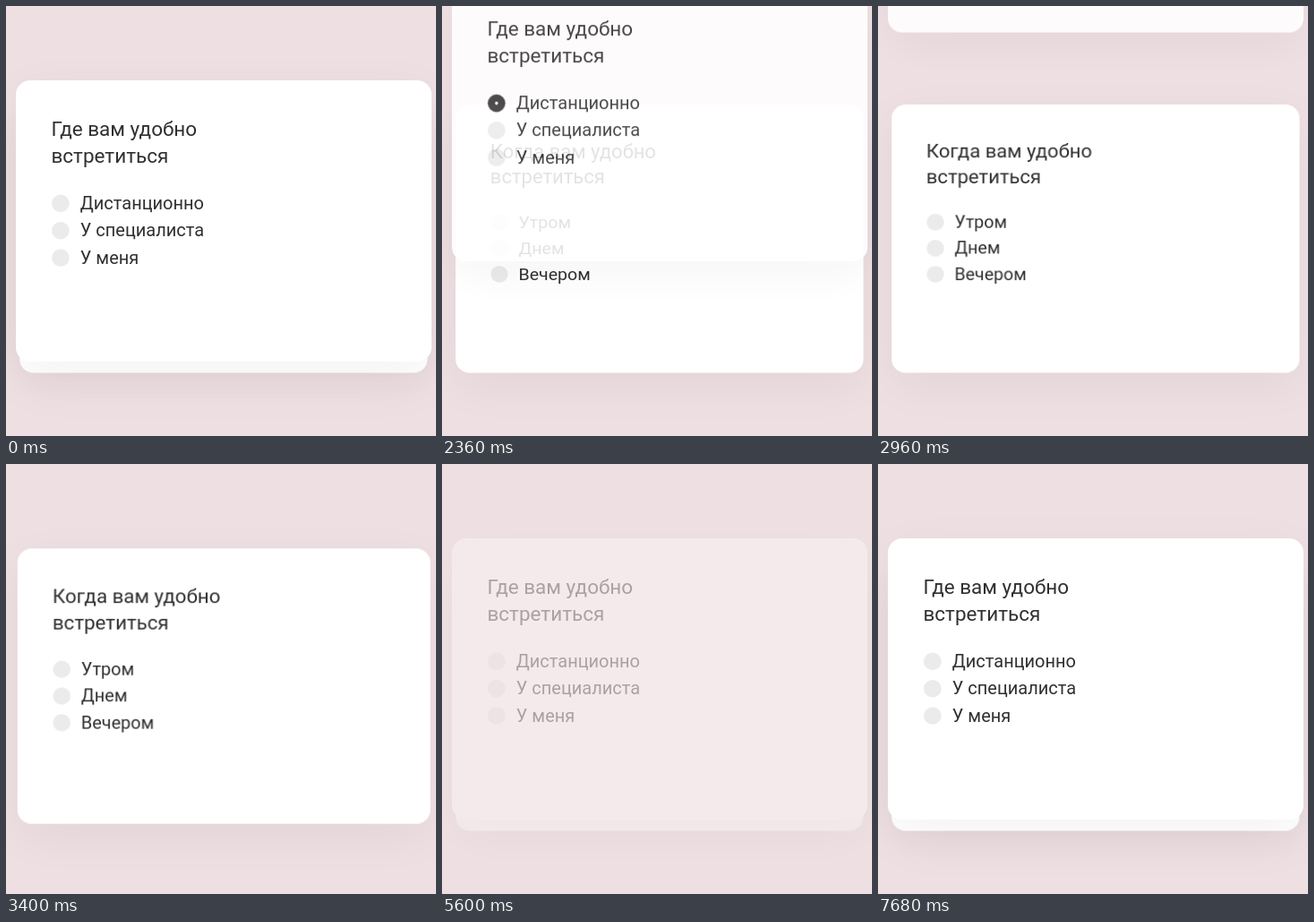
Recreate the animation shown at these times as an HTML page. Size 480 px wide and 480 px high, loop 8000 ms.

```html
<!DOCTYPE html>
<html lang="ru">
<head>
<meta charset="utf-8">
<title>Опрос</title>
<style>
  html, body { margin: 0; width: 100%; height: 100%; overflow: hidden; background: #eedfe2; }
  #stage { position: absolute; left: 0; top: 0; width: 480px; height: 480px; overflow: hidden; background: #eedfe2; }
  #deck { position: absolute; inset: 0; }
  .card {
    position: absolute; left: 10.7px; top: 83.2px; width: 464.6px; height: 313.4px;
    border-radius: 16px; background: #fff; transform-origin: 0 0;
    box-shadow: 0 15px 54px rgba(0, 0, 0, .05);
  }
  svg { display: block; width: 100%; height: 100%; }
  text { font-family: Roboto, Arial, sans-serif; fill: #303030; }
  .title { font-size: 22.5px; }
  .option { font-size: 20px; }
  .radio { fill: #ebebeb; }
  .mark { fill: #333; }
  .dot { fill: #fff; }
</style>
</head>
<body>
<div id="stage"><div id="deck"></div></div>
<script>
const LOOP = 8000;
const RESET = 5320; // cards return to their places while hidden
const deck = document.getElementById('deck');

function makeCard(title, options, chosen) {
  const card = document.createElement('div');
  card.className = 'card';
  const heading = title.map((line, i) =>
    `<text class="title" x="50.2" y="${145.6 + 29.6 * i}">${line}</text>`);
  const rows = options.map((label, i) => {
    const y = 220.6 + 30.3 * i;
    const mark = i === chosen
      ? `<g class="pick"><circle class="mark" cx="60.6" cy="${y}" r="9.8"/><circle class="dot" cx="60.6" cy="${y}" r="1.8"/></g>`
      : '';
    return `<circle class="radio" cx="60.6" cy="${y}" r="9.8"/>${mark}
      <text class="option" x="82.5" y="${y + 6.7}">${label}</text>`;
  });
  card.innerHTML = `<svg viewBox="10.7 83.2 464.6 313.4">${heading.join('')}${rows.join('')}</svg>`;
  deck.append(card);
  return card;
}

// steps: [time in ms, value, easing towards the next step]
function play(el, prop, steps) {
  const all = [[0, steps[0][1]], ...steps, [LOOP, steps[steps.length - 1][1]]];
  const frames = all.map(([t, value, easing = 'linear']) =>
    ({ offset: t / LOOP, [prop]: value, easing }));
  const anim = el.animate(frames, { duration: LOOP, iterations: Infinity });
  anim.startTime = document.timeline.currentTime;
}

const when = makeCard(['Когда вам удобно', 'встретиться'], ['Утром', 'Днем', 'Вечером'], 2);
const where = makeCard(['Где вам удобно', 'встретиться'], ['Дистанционно', 'У специалиста', 'У меня'], 0);

const up = y => `translateY(${-y}px)`;
const back = 'translate(4.2px, 26.9px) scale(.979, .957)';
const front = 'translate(0px, 0px) scale(1, 1)';

play(where.querySelector('.pick'), 'opacity',
  [[1110, 0, 'ease'], [1430, 1], [RESET, 1], [RESET, 0]]);
play(where, 'transform',
  [[2120, up(0)], [2360, up(111.5)], [2960, up(367)], [3200, up(470)], [RESET, up(470)], [RESET, up(0)]]);
play(where, 'opacity',
  [[2120, 1], [2320, .87], [RESET, .87], [RESET, 1]]);

play(when, 'transform',
  [[2960, back], [3720, front], [RESET, front], [RESET, back]]);
play(when.querySelector('.pick'), 'opacity',
  [[3890, 0, 'ease'], [4200, 1], [RESET, 1], [RESET, 0]]);

play(deck, 'opacity',
  [[4890, 1, 'ease-in-out'], [5250, 0], [5440, 0, 'cubic-bezier(.33, 1, .68, 1)'], [6640, 1]]);
</script>
</body>
</html>
```
